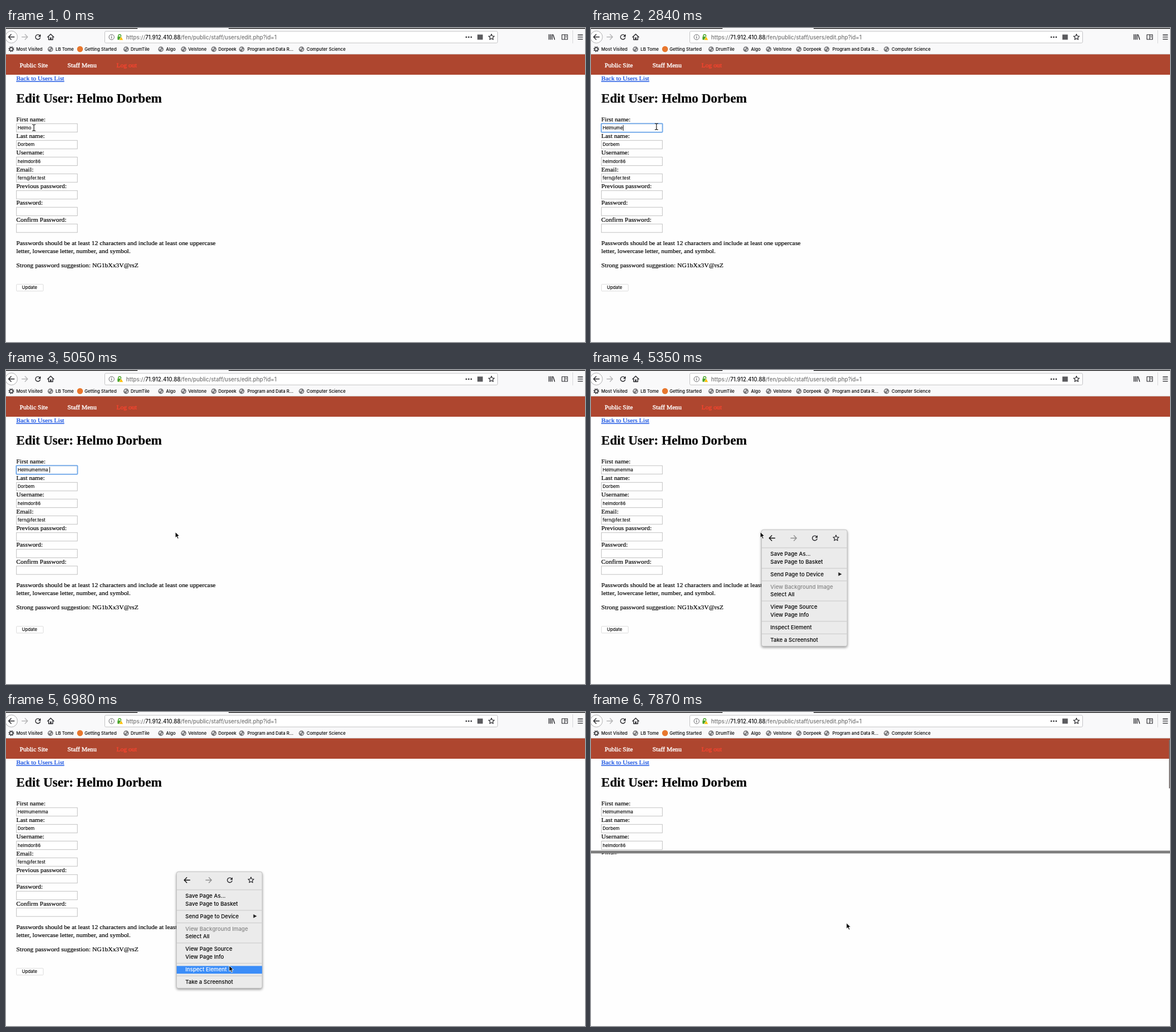
Animation, 1017 px wide and 551 px high, one loop 8000 ms. Source, as an HTML page:

```html
<!DOCTYPE html>
<html lang="en">
<head>
<meta charset="utf-8">
<title>Edit user</title>
<style>
  html, body { margin: 0; width: 100%; height: 100%; overflow: hidden; background: #fefefe; }
  svg { display: block; color: #000; }
  text { white-space: pre; fill: currentColor; }
  .page { font: 11.37px "Liberation Serif", serif; stroke: currentColor; stroke-width: .2; }
  .ui { font: 500 7.75px Inter, sans-serif; }
  .url { font: 500 9.65px Inter, sans-serif; }
  .item { font: 500 9.5px Inter, sans-serif; }
  .line { fill: none; stroke-width: 1.4; stroke-linecap: round; stroke-linejoin: round; }
</style>
</head>
<body>
<svg id="stage" width="1017" height="551" viewBox="0 0 1017 551"></svg>
<script>
const LOOP = 8000;
const DARK = '#2a2a2e';

const text = (x, y, content, cls = 'page', extra = '') =>
  `<text x="${x}" y="${y}" class="${cls}" ${extra}>${content}</text>`;
const rect = (x, y, w, h, fill, extra = '') =>
  `<rect x="${x}" y="${y}" width="${w}" height="${h}" fill="${fill}" ${extra}/>`;
const line = (d, color = DARK, extra = '') =>
  `<path class="line" d="${d}" stroke="${color}" ${extra}/>`;
const group = (id, content) => `<g id="${id}">${content}</g>`;

const arrowIcon = (x, y, dir, color) =>
  line(`M${x - 5 * dir} ${y}h${10 * dir}m${-4.5 * dir} -4.5l${4.5 * dir} 4.5l${-4.5 * dir} 4.5`, color);
const reloadIcon = (x, y) =>
  line(`M${x + 3.3} ${y - 2.6}A4.2 4.2 0 1 0 ${x + 4} ${y + 1.4}`) +
  `<path d="M${x + 5} ${y - 5}v4.6h-4.6z" fill="${DARK}"/>`;
const starIcon = (x, y) => {
  const points = Array.from({ length: 10 }, (_, i) => {
    const r = i % 2 ? 2.5 : 5.3, a = i * Math.PI / 5;
    return `${x + r * Math.sin(a)},${y - r * Math.cos(a)}`;
  });
  return line(`M${points.join('L')}Z`, DARK, 'style="stroke-width:1.2"');
};
const globeIcon = (x, y) =>
  `<circle cx="${x}" cy="${y}" r="4.7" fill="#77777a"/>` +
  `<path d="M${x - 3.5} ${y - 1.5}l3 -2l1.5 1.5l-2 2.5l-1.5 .3zM${x + .5} ${y + .5}l2.8 -1l-.6 2.8l-1.8 1z" fill="#d8d8da"/>`;
const gearIcon = (x, y) =>
  `<circle cx="${x}" cy="${y}" r="2.8" fill="none" stroke="${DARK}" stroke-width="1.3"/>` +
  `<circle cx="${x}" cy="${y}" r="4.2" fill="none" stroke="${DARK}" stroke-width="1.5" stroke-dasharray="1.6 1.7"/>`;

function toolbar() {
  const bookmarks = [
    [78, 87, 'LB Tome'], [130, 138, 'Getting Started'], [211, 219, 'DrumTile'],
    [272, 281, 'Algo'], [312, 320, 'Velstone'], [365, 373, 'Dorpeek'],
    [414, 424, 'Program and Data R...'], [519, 528, 'Computer Science']
  ];
  return rect(0, 0, 1017, 46, '#f9f9fa') + rect(0, 45.5, 1017, .8, '#cfcfd1') +
    rect(0, 0, 231, 1.3, '#0c0c0d') + rect(391, 0, 626, 1.3, '#0c0c0d') +
    '<circle cx="9.5" cy="15.8" r="10.6" fill="#fff" stroke="#b0b0b2"/>' +
    arrowIcon(9.5, 15.8, -1, DARK) + arrowIcon(33, 15.8, 1, '#b5b5b7') + reloadIcon(56, 15.8) +
    line('M73 16L78.5 10.8L84 16M74.8 15.5V20.5H82.2V15.5') + rect(77.3, 16.5, 2.4, 4, DARK) +
    rect(173.5, 5.8, 690, 20.4, '#fff', 'stroke="#c4c4c6" rx="2"') +
    '<circle cx="185.5" cy="16" r="4.6" fill="none" stroke="#6b6b6e"/>' +
    rect(185, 15, 1.1, 3.6, '#6b6b6e') + rect(185, 13, 1.1, 1.2, '#6b6b6e') +
    line('M197.3 15.5V13.8a2.3 2.3 0 0 1 4.6 0V15.5', '#4ba52d') + rect(195.8, 15, 7, 5.8, '#4ba52d', 'rx="1"') +
    '<path d="M202.3 14.8l3.6 6.5h-7.2z" fill="#ffbf00" stroke="#fff" stroke-width=".6"/>' +
    text(211, 19.5, 'https://<tspan color="#0c0c0d">71.912.410.88</tspan>/fen/public/staff/users/edit.php?id=1',
      'url', 'color="#737373"') +
    [808.5, 812.8, 817.1].map(x => `<circle cx="${x}" cy="16" r="1.35" fill="${DARK}"/>`).join('') +
    rect(828, 11.5, 9.5, 9, '#5b5b5e') + starIcon(852.7, 16) +
    line('M953.8 11.5V20M956.5 11.5V20M959.2 11.5V20M961 11.8L963.6 20') +
    line('M976.5 11.7h9.8v8.3h-9.8zM981.4 11.7v8.3M983.3 14h1M983.3 16h1', DARK, 'style="stroke-width:1.1"') +
    rect(995, 4, .8, 23, '#d0d0d2') +
    line('M1004.8 12.2h8M1004.8 15.9h8M1004.8 19.6h8') +
    gearIcon(9.3, 37.2) + text(18, 40, 'Most Visited', 'ui') +
    bookmarks.map(([iconX, x, name], i) =>
      (i === 1 ? `<circle cx="${iconX}" cy="37" r="5.2" fill="#e8772e"/>` : globeIcon(iconX, 37.2)) +
      text(x, 40, name, 'ui')).join('');
}

function page() {
  const fields = [
    ['First name:', ''], ['Last name:', 'Dorbem'], ['Username:', 'helmdor86'],
    ['Email:', 'fern@fer.test'], ['Previous password:', ''], ['Password:', ''], ['Confirm Password:', '']
  ];
  const navLink = (x, label, color) =>
    text(x, 68.7, label, 'page', `color="${color}" style="stroke-width:.4"`);
  return rect(0, 46, 1017, 36, '#ae462f') +
    navLink(24, 'Public Site', '#fff') + navLink(108, 'Staff Menu', '#fff') + navLink(194, 'Log out', '#f5442f') +
    text(18, 92.2, 'Back to Users List', 'page', 'color="#0645e0" text-decoration="underline"') +
    text(18, 130.7, 'Edit User: Helmo Dorbem', 'page', 'style="font-size:22.74px;font-weight:bold"') +
    fields.map(([label, value], i) => {
      const y = i * 29.35;
      return text(18, 163.5 + y, label) +
        rect(18.3, 167.9 + y, 107, 14.8, '#fff', 'stroke="#bcbcbc" stroke-width=".9"') +
        text(20.5, 178.1 + y, value, 'ui', i ? '' : 'id="firstName"');
    }).join('') +
    group('focus', rect(18, 167.6, 107.6, 15.2, 'none', 'stroke="#6fa8ea" stroke-width="1.8" rx="1"') +
      rect(0, 170.3, .9, 10, '#000', 'id="caret"')) +
    text(18, 380.6, 'Passwords should be at least 12 characters and include at least one uppercase') +
    text(18, 394.8, 'letter, lowercase letter, number, and symbol.') +
    text(18, 419.6, 'Strong password suggestion: NG1bXx3V@rsZ') +
    rect(18.4, 449.8, 47, 11.8, '#fff', 'stroke="#d4d4d4" stroke-width=".8" rx="1"') +
    text(28, 458.2, 'Update', 'ui');
}

const menuRows = {
  'Save Page As...': 323, 'Save Page to Basket': 336.5, 'Send Page to Device': 358.3,
  'View Background Image': 380.5, 'Select All': 394, 'View Page Source': 416,
  'View Page Info': 429.8, 'Inspect Element': 452, 'Take a Screenshot': 474
};
const DISABLED_ROW = 'View Background Image';

function menu() {
  return rect(299.5, 280.3, 150.5, 204.5, '#ebebeb',
      'rx="3.5" stroke="#b9b9b9" stroke-width=".8" style="filter:drop-shadow(0 2px 2px #0006)"') +
    arrowIcon(318, 295, -1, '#111') + arrowIcon(356, 295, 1, '#8e8e8e') +
    reloadIcon(393, 295) + starIcon(430.3, 295) +
    [312, 348, 370, 405.3, 441, 463].map(y => rect(300, y - .6, 149.6, 1.3, '#d0d0d0')).join('') +
    rect(299.8, 0, 150, 13.6, '#3b8df8', 'id="highlight"') +
    '<path d="M434.5 355v6.6l6 -3.3z" fill="#222"/>' +
    Object.entries(menuRows).map(([name, y]) =>
      text(315, y + 3.4, name, 'item',
        `data-row="${name}" color="${name === DISABLED_ROW ? '#858585' : '#000'}"`)).join('');
}

const inspector = rect(0, 250, 1017, 301, '#fefefe') + rect(0, 243.3, 1017, 4.9, '#7f7f7f') +
  rect(1015.3, 49, 1.7, 85, '#77706e');

const pointers =
  group('beam', line('M-2.5 -5.5Q0 -5.5 0 -4V4Q0 5.5 2.5 5.5M2.5 -5.5Q0 -5.5 0 -4M0 4Q0 5.5 -2.5 5.5', '#111', 'style="stroke-width:1.1"')) +
  group('arrow', '<path d="M0 0V10.2L2.4 8L4.2 12L6 11.2L4.3 7.3H7.6Z" fill="#000" stroke="#fff" stroke-width=".9"/>');

const stage = document.getElementById('stage');
stage.innerHTML = page() + toolbar() + group('menu', menu()) + group('inspector', inspector) + pointers;
const el = id => document.getElementById(id);

// Each step holds until the next one; later entries override earlier ones.
const steps = [
  [0, { name: 'Helmo', focus: false, menu: false, row: '', split: false, pointer: 'beam', at: [49, 175] }],
  [140, { focus: true }],
  [610, { at: [62, 175] }],
  [760, { at: [95, 174] }],
  [910, { at: [115, 173] }],
  [1490, { name: 'Helm' }],
  [2090, { name: 'Helmu' }],
  [2540, { name: 'Helmum' }],
  [2840, { name: 'Helmume' }],
  [3130, { name: 'Helmumem' }],
  [3280, { name: 'Helmumemma' }],
  [3580, { name: 'Helmumemma ' }],
  [4020, { pointer: 'arrow', at: [165, 212] }],
  [4160, { at: [255, 266] }],
  [4310, { at: [284.5, 278.7] }],
  [4610, { at: [288, 280] }],
  [4760, { at: [293, 282] }],
  [4910, { at: [296, 283.5] }],
  [5050, { at: [297.3, 284.3] }],
  [5350, { focus: false, menu: true }],
  [5800, { at: [325, 340], row: 'Save Page to Basket' }],
  [5940, { at: [357, 390], row: 'Select All' }],
  [6240, { at: [370, 405], row: '' }],
  [6390, { at: [379, 416], row: 'View Page Source' }],
  [6530, { at: [384, 422.7] }],
  [6680, { at: [387, 429], row: 'View Page Info' }],
  [6830, { at: [390, 437] }],
  [6970, { at: [392, 445], row: 'Inspect Element' }],
  [7120, { at: [393, 448] }],
  [7270, { at: [394, 450] }],
  [7720, { at: [397.3, 433] }],
  [7870, { at: [448.7, 370.3], menu: false, row: '', split: true }]
];

const show = (id, visible) => { el(id).style.display = visible ? '' : 'none'; };

function render(time) {
  const state = Object.assign({}, ...steps.filter(([start]) => start <= time).map(([, change]) => change));
  el('firstName').textContent = state.name;
  el('caret').setAttribute('x', 20.8 + el('firstName').getComputedTextLength());
  show('focus', state.focus);
  show('menu', state.menu);
  show('inspector', state.split);
  show('highlight', state.row);
  if (state.row) el('highlight').setAttribute('y', menuRows[state.row] - 6.4);
  for (const row of document.querySelectorAll('[data-row]'))
    row.style.color = row.dataset.row === state.row ? '#fff' : '';
  for (const id of ['beam', 'arrow']) {
    show(id, id === state.pointer);
    el(id).setAttribute('transform', `translate(${state.at})`);
  }
}

const start = performance.now();
function tick() {
  render((performance.now() - start) % LOOP);
  requestAnimationFrame(tick);
}
tick();
</script>
</body>
</html>
```
